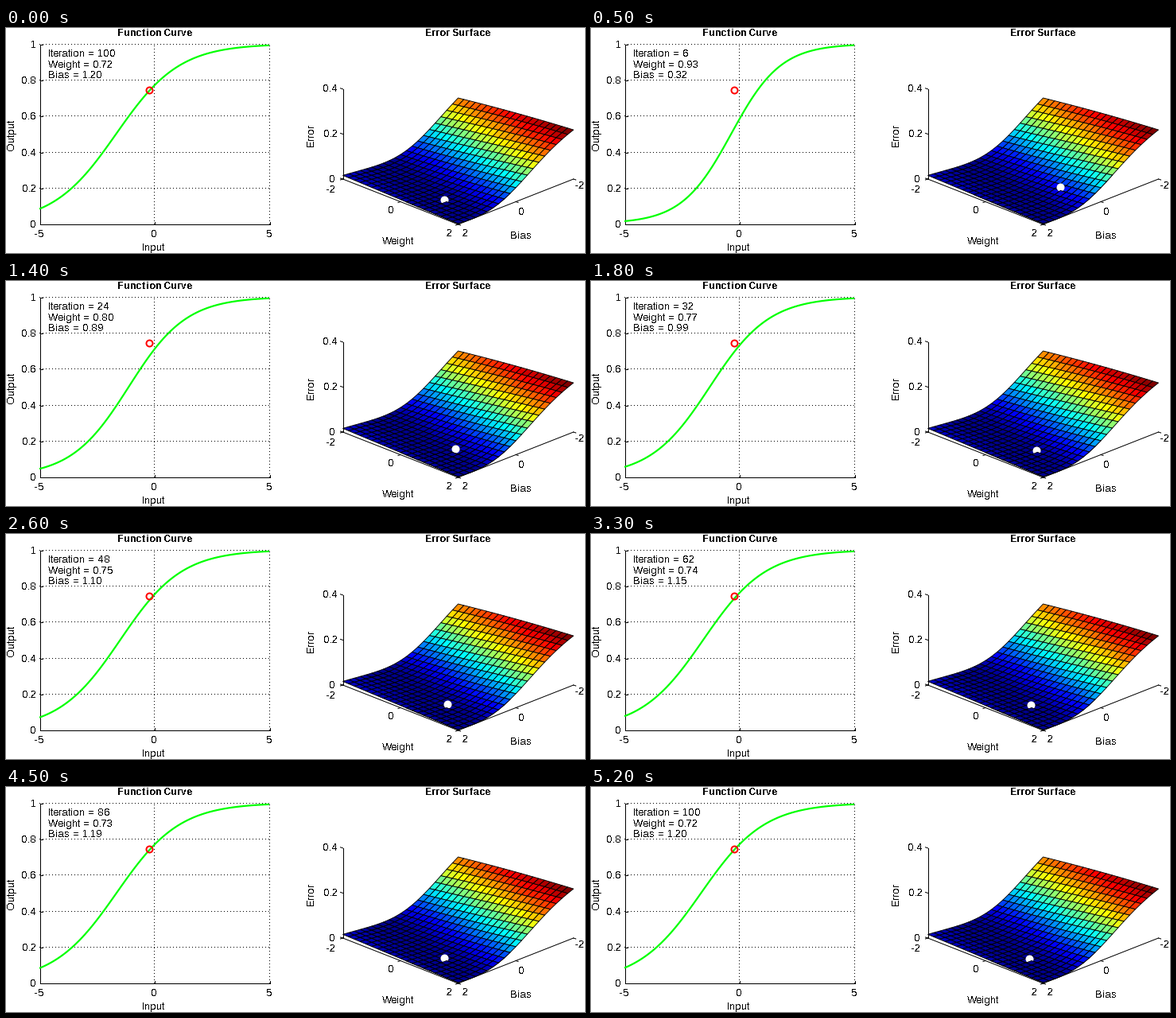
These frames come from a looping animation (728 px wide and 283 px high, 6.2 s). A matplotlib script:

```python
import numpy as np
import matplotlib.pyplot as plt
from matplotlib.animation import FuncAnimation
from matplotlib.collections import PolyCollection

W, H, DPI = 728, 283, 64
PX = 72 / DPI  # points per pixel

plt.rcParams.update({
    "font.family": "Liberation Sans",
    "font.size": 13 * PX,
    "text.antialiased": False,
    "text.hinting": "force_autohint",
    "text.hinting_factor": 1,
    "axes.unicode_minus": False,
})

fig = plt.figure(figsize=(W / DPI, H / DPI), dpi=DPI, facecolor="white")
ax = fig.add_axes([0, 0, 1, 1])
ax.set_xlim(0, W)
ax.set_ylim(H, 0)
ax.axis("off")

# One neuron trained on a single sample by gradient descent
X_IN, TARGET, RATE = -0.2295, 0.7403, 1.0


def sigmoid(u):
    return 1 / (1 + np.exp(-u))


def error(w, b):
    return 0.5 * (TARGET - sigmoid(w * X_IN + b)) ** 2


def train(steps):
    w, b = 1.0, 0.0
    path = [(w, b)]
    for _ in range(steps):
        a = sigmoid(w * X_IN + b)
        grad = (TARGET - a) * a * (1 - a)
        w += RATE * grad * X_IN
        b += RATE * grad
        path.append((w, b))
    return path


path = train(99)


def line(x, y):
    ax.plot(np.add(x, 0.5), np.add(y, 0.5), color="k", lw=PX)


def dotted(x, y):
    ax.plot(x, y, color="k", lw=PX, ls=(0, (1, 3)), snap=False)


def label(x, y, s, ha="center", **kw):
    return ax.text(x, y, s, ha=ha, va="baseline", **kw)


def upright(x, y, s):
    label(x, y, s, rotation=90, rotation_mode="anchor")


def title(x, s):
    label(x, 10, s, weight="bold", size=12.4 * PX)


# Left plot: output against input
def plot_x(v):
    return 42 + (v + 5) * 28.9


def plot_y(v):
    return 246 - 226 * v


for k in range(6):
    v = k / 5
    y = round(plot_y(v))
    label(38, y + 5, f"{v:g}", ha="right")
    line([42, 45], [y, y])
    if k:
        dotted([42, 332], [y + 0.5, y + 0.5])
for v in (-5, 0, 5):
    x = int(plot_x(v))
    label(x, 263, str(v))
    line([x, x], [246, 243])
    if v > -5:
        dotted([x + 0.5, x + 0.5], [247, 20])
line([42, 42], [20, 246])
line([42, 331], [246, 246])

title(187, "Function Curve")
label(185, 280, "Input")
upright(10, 134, "Output")

inputs = np.linspace(-5, 5, 101)
curve, = ax.plot(plot_x(inputs), plot_y(inputs * 0), color="#00ff00",
                 lw=2.2 * PX, solid_capstyle="butt", zorder=4)
ax.plot(180, 78, "o", ms=8 * PX, mfc="none", mec="red", mew=2 * PX, zorder=5)
notes = [label(53, y, "", ha="left", zorder=6) for y in (36, 50, 63)]


# Right plot: error surface
Z_SCALE = 283


def project(w, b, z=0.0):
    return 568 + 36.25 * (w - b), 189.5 + 14.25 * (w + b) - Z_SCALE * z


def jet(v):
    k = 4 * (np.minimum(np.floor(v * 64), 63) + 1) / 64
    rgb = [np.minimum(k - s, 3 + s - k) for s in (1.5, 0.5, -0.5)]
    return np.clip(np.stack(rgb, axis=-1), 0, 1)


def build_faces():
    grid = np.linspace(-2, 2, 21)
    d = grid[1] - grid[0]
    ww, bb = (m.ravel() for m in np.meshgrid(grid[:-1], grid[:-1]))
    order = np.argsort(ww + bb, kind="stable")
    ww, bb = ww[order], bb[order]
    corners = [(0, 0), (d, 0), (d, d), (0, d)]
    polys = np.array([np.transpose(project(ww + i, bb + j,
                                           error(ww + i, bb + j)))
                      for i, j in corners]).transpose(1, 0, 2) + 0.5
    full = error(*np.meshgrid(grid, grid))
    low, high = full.min(), full.max()
    colors = jet((error(ww, bb) - low) / (high - low))
    return polys, colors, ww + bb


polys, colors, depth = build_faces()


def surface(zorder):
    mesh = PolyCollection(polys, facecolors=colors, edgecolors="k",
                          linewidths=0.9 * PX, zorder=zorder)
    ax.add_collection(mesh, autolim=False)
    return mesh


base = [project(*p) for p in ((-2, 2), (2, 2), (2, -2))]
line(*zip(*base))
line([423, 423], [76, 189])
for z, x in ((0, 414), (0.2, 417), (0.4, 417)):
    y = project(-2, 2, z)[1]
    line([420, 423], [y - 1, y])
    label(x, round(y) + 4, f"{z:g}", ha="right")
for v in (-2, 0, 2):
    x, y = project(v, 2)
    line([x, x - 3], [y, y + 1])
    x, y = project(2, v)
    line([x, x + 3], [y, y + 1])
for x, y, s in ((408, 207, "-2"), (484, 233, "0"), (557, 262, "2"),
                (577, 262, "2"), (648, 235, "0"), (721, 202, "-2"),
                (493, 272, "Weight"), (648, 265, "Bias")):
    label(x, y, s)
title(568, "Error Surface")
upright(387, 135, "Error")

LIFT = 0.005  # the ball rides just above the surface
surface(2)
ball, = ax.plot([], [], "o", ms=10 * PX, mfc="white", mew=0, zorder=3)
front = surface(4)  # faces nearer than the ball


def draw(n):
    step = 100 if n == 0 else min(100, max(1, 2 * n - 4))
    w, b = path[step - 1]
    curve.set_ydata(plot_y(sigmoid(w * inputs + b)))
    texts = f"Iteration = {step}", f"Weight = {w:.2f}", f"Bias = {b:.2f}"
    for note, s in zip(notes, texts):
        note.set_text(s)
    x, y = project(w, b, error(w, b) + LIFT)
    ball.set_data([x], [y])
    near = depth > w + b
    front.set_verts(polys[near])
    front.set_facecolor(colors[near])
    return [curve, ball, front, *notes]


anim = FuncAnimation(fig, draw, frames=62, interval=100, repeat=True,
                     repeat_delay=0, blit=False)
plt.show()
```
